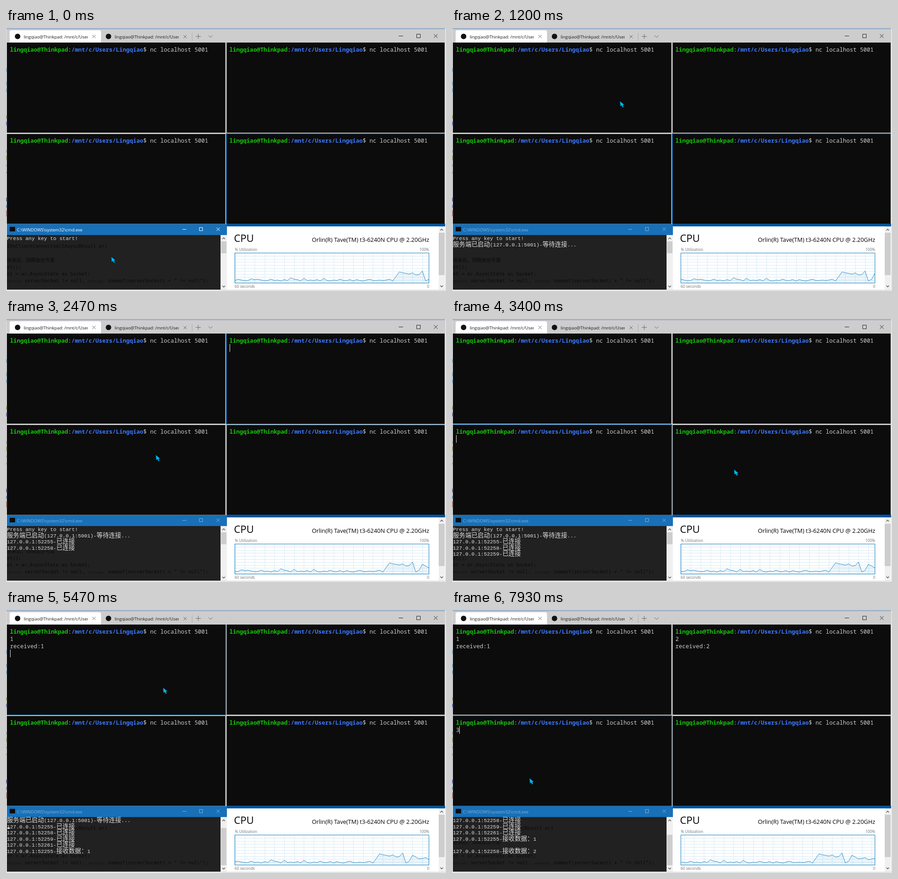
An HTML page that plays this animation: 968 by 578 pixels, repeating every 8000 ms.

```html
<!DOCTYPE html>
<html lang="en">
<head>
<meta charset="utf-8">
<title>Socket server demo</title>
<style>
  html, body { margin: 0; width: 100%; height: 100%; overflow: hidden; background: #e4e4e4; }
  svg { display: block; width: 968px; height: 578px; }
  text { white-space: pre; }
  .ui { font-family: "Open Sans", "Noto Sans", sans-serif; font-size: 9.45px; }
  .small { font-size: 8.5px; fill: #707070; }
  .end { text-anchor: end; }
  .term { font: 500 12.54px "Noto Sans Mono", "DejaVu Sans Mono", monospace; fill: #ccc; }
  .user { fill: #16c60c; font-weight: 600; }
  .path { fill: #3b78ff; font-weight: 600; }
  .con { font: 11.33px "Liberation Mono", monospace; fill: #dedede; }
  .cjk { font: 300 13.6px "Noto Sans CJK SC", "Noto Sans CJK", sans-serif; }
  .ghost { font: 10.5px "DejaVu Sans Mono", "Noto Sans CJK SC", monospace; fill: #0b0b0d; }
  .icon { fill: none; stroke: #222; }
  .cmd { stroke: #fff; fill: none; }
  .cmd text { fill: #fff; stroke: none; }
  .cmd.idle { opacity: .45; }
</style>
</head>
<body>
<svg id="stage" viewBox="0 0 968 578">
  <defs>
    <clipPath id="tab1"><rect x="30" y="5" width="150" height="27"/></clipPath>
    <clipPath id="tab2"><rect x="230" y="5" width="150" height="27"/></clipPath>
    <clipPath id="conClip"><rect x="2" y="455" width="470" height="120"/></clipPath>
    <clipPath id="plotClip"><rect x="503" y="494" width="428" height="67"/></clipPath>
  </defs>

  <g id="edge"></g>

  <!-- terminal window -->
  <rect x="1" y="1" width="965" height="430" fill="#cdcdcd"/>
  <path d="M1 1.5H966" stroke="#4a7db0"/>
  <path d="M8 32V9q0-4 4-4H205q4 0 4 4V32Z" fill="#fff"/>
  <circle cx="25.5" cy="18.5" r="6" fill="#111"/>
  <circle cx="225.5" cy="18.5" r="6" fill="#111"/>
  <g class="ui" fill="#1a1a1a">
    <text x="39" y="23.3" clip-path="url(#tab1)">lingqiao@Thinkpad: /mnt/c/Users</text>
    <text x="239" y="23.3" clip-path="url(#tab2)">lingqiao@Thinkpad: /mnt/c/Users</text>
  </g>
  <path class="icon" style="stroke:#666" d="M190 15l7 7m0-7l-7 7M390.500 15.500l7 7m0-7l-7 7M417.500 18.500h11m-5.500-5.500v11M445.500 16.500l4.500 4 4.500-4"/>
  <path d="M409.500 11V28" stroke="#aaa"/>
  <path class="icon" d="M864 17.500h9.500M903.500 13.500h8v8h-8zM941.500 13.500l8 8m0-8l-8 8"/>
  <g id="panes"></g>
  <rect id="caret" width="1" height="17" fill="#eee"/>

  <!-- performance panel -->
  <rect x="486" y="430" width="480" height="6" fill="#00539b"/>
  <rect x="486" y="436" width="480" height="139" fill="#fff"/>
  <rect x="952" y="436" width="13" height="139" fill="#f0f0f0"/>
  <rect x="952" y="450" width="13" height="93" fill="#cdcdcd"/>
  <path class="icon" style="stroke:#555" stroke-width="1.300" d="M955.500 445l3-3 3 3M955.500 566l3 3 3-3"/>
  <g class="ui">
    <text x="501.500" y="470" font-size="22.300">CPU</text>
    <text class="end" x="931" y="470" font-size="12.900">Orlin(R) Tave(TM) t3-6240N CPU @ 2.20GHz</text>
    <text class="small" x="503.500" y="489.500">% Utilization</text>
    <text class="small end" x="931" y="489.500">100%</text>
    <text class="small" x="503" y="571">60 seconds</text>
    <text class="small end" x="931" y="571">0</text>
  </g>
  <g clip-path="url(#plotClip)">
    <path id="grid" fill="none" stroke="#d9eaf4"/>
    <path id="area" fill="#117dbb" fill-opacity=".08"/>
    <path id="line" fill="none" stroke="#117dbb" stroke-width=".9"/>
  </g>
  <rect x="503.500" y="494.500" width="427" height="66" fill="none" stroke="#117dbb"/>

  <!-- console window -->
  <rect x="2" y="431" width="484" height="24" fill="#1870b8"/>
  <rect x="8" y="437" width="12" height="10" fill="#0c0c0c"/>
  <g id="cmd" class="cmd">
    <text class="ui" x="24" y="446.500">C:\WINDOWS\system32\cmd.exe</text>
    <path d="M388 442.500h8.500M425.500 438.500h7v7h-7zM463 438.500l7.500 7.500m0-7.500l-7.500 7.500"/>
  </g>
  <rect x="2" y="455" width="470" height="120" fill="#212121"/>
  <g clip-path="url(#conClip)">
    <g id="ghost" class="ghost"></g>
    <g id="con" class="con"></g>
    <rect id="mark" x="3" y="478" width="5" height="3" fill="#eee"/>
  </g>
  <rect x="472" y="455" width="14" height="120" fill="#f0f0f0"/>
  <rect id="thumb" x="473" width="12" fill="#cdcdcd"/>
  <path class="icon" style="stroke:#555" stroke-width="1.300" d="M476 464l3-3 3 3M476 566.500l3 3 3-3"/>

  <path id="mouse" d="M.5 .5L1.300 12.500 4 10.300 6.300 14.500 8.800 13.200 6.800 9.400 10.300 8.800Z" fill="#00b9f5" stroke="#06222e" stroke-width=".8"/>
</svg>
<script>
const LOOP = 8000, FPS = 15, CHAR = 7.525, ROW = 13.6;
const $ = id => document.getElementById(id);

function add(parent, tag, attrs, text) {
  const el = document.createElementNS('http://www.w3.org/2000/svg', tag);
  for (const k in attrs) el.setAttribute(k, attrs[k]);
  if (text) el.textContent = text;
  parent.appendChild(el);
  return el;
}
const show = (el, on) => { el.style.display = on ? '' : 'none'; };

// Slivers of the editor behind the windows: y, height, colour
[[88, 8, '#4aa3d8'], [118, 8, '#4aa3d8'], [133, 8, '#4aa3d8'], [192, 7, '#8a8a3a'], [206, 8, '#3048c0'],
 [268, 6, '#999'], [280, 10, '#8a9a3a'], [300, 4, '#999'], [316, 4, '#999'], [373, 8, '#2a2a90'],
 [389, 6, '#2a6ac0'], [401, 13, '#b05050']]
  .forEach(([y, height, fill]) => add($('edge'), 'rect', { x: 0, y, width: 2, height, fill }));

// Terminal panes, each with borders on its inner sides
const timed = [];
const panes = [[2, 32], [484, 32], [2, 231.5], [484, 231.5]].map(([x, y], i) => {
  const right = i % 2, low = i > 1, w = right ? 481 : 482, h = low ? 199 : 199.5;
  const g = add($('panes'), 'g');
  const border = add(g, 'rect', { x, y, width: w, height: h });
  add(g, 'rect', { x: x + (right ? 1.5 : 0), y: y + (low ? 1.5 : 0), width: w - 1.5, height: h - 1.5, fill: '#0c0c0c' });
  const tx = right ? 491.5 : 8.7, ty = low ? 251.7 : 51.7;
  const prompt = add(g, 'text', { x: tx, y: ty, class: 'term' });
  add(prompt, 'tspan', { class: 'user' }, 'lingqiao@Thinkpad');
  add(prompt, 'tspan', {}, ':');
  add(prompt, 'tspan', { class: 'path' }, '/mnt/c/Users/Lingqiao');
  add(prompt, 'tspan', {}, '$ nc localhost 5001');
  return { g, border, tx, ty };
});
[[4930, 0, 1, '1'], [5130, 0, 2, 'received:1'], [6400, 1, 1, '2'], [6670, 1, 2, 'received:2'], [7930, 2, 1, '3']]
  .forEach(([at, i, row, s]) => {
    const p = panes[i];
    timed.push({ at, el: add(p.g, 'text', { x: p.tx, y: p.ty + row * 16, class: 'term' }, s) });
  });

// Code showing faintly through the console
[[2, 483, 'IOnClientConnected(IAsyncResult ar)'], [2, 514, '进来后，则释放信号量'], [2, 529, 'et();'],
 [2, 544, 'et = ar.AsyncState as Socket;'], [41, 559, 'serverSocket != null,'],
 [224, 559, 'nameof(serverSocket) + " != null");']]
  .forEach(([x, y, s]) => add($('ghost'), 'text', { x, y }, s));
add($('ghost'), 'text', { x: -8, y: 559, style: 'font-size:7.5px', opacity: .6 }, 'condition:');
add($('ghost'), 'text', { x: 182, y: 559, style: 'font-size:7.5px', opacity: .6 }, 'message:');

// Console output: time, row, text
const peer = (at, row, port, s) => [at, row, `127.0.0.1:${port}-${s}`];
[[0, 0, 'Press any key to start!'],
 [70, 1, '服务端已启动(127.0.0.1:5001)-等待连接...'],
 peer(1600, 2, 52255, '已连接'), peer(2070, 3, 52258, '已连接'),
 peer(3000, 4, 52259, '已连接'), peer(3670, 5, 52261, '已连接'),
 peer(5130, 6, 52255, '接收数据：1'), peer(6670, 8, 52258, '接收数据：2')]
  .forEach(([at, row, s]) => {
    const el = add($('con'), 'g'), y = 455 + row * ROW;
    const parts = s.match(/[\x00-\xff]+|[^\x00-\xff]+/g);
    const wide = c => c.charCodeAt(0) > 255;
    const cells = [...s].reduce((n, c) => n + (wide(c) ? 2 : 1), 0);
    add(el, 'rect', { x: 2, y, width: cells * 6.8, height: ROW, fill: '#212121' });
    const text = add(el, 'text', { x: 2, y: y + 11 });
    parts.forEach(p => add(text, 'tspan', wide(p) ? { class: 'cjk' } : {}, p));
    timed.push({ at, el });
  });

// CPU load, one sample per second
const load = [5, 8, 6, 5, 5, 9, 7, 8, 6, 5, 5, 8, 5, 6, 4, 7, 5, 11, 8, 7, 4, 10, 5, 6, 5, 7, 4, 10, 5, 4, 6, 5, 8, 5,
  5, 7, 4, 7, 5, 4, 6, 8, 5, 5, 6, 5, 6, 8, 4, 14, 24, 22, 21, 19, 22, 17, 18, 26, 4, 8, 21, 17, 13, 14, 16, 11, 13, 14];
const DX = 427 / 59;
let plotted = -1;
function plot(k) {
  if (k === plotted) return;
  plotted = k;
  const pts = load.slice(k, k + 60).map((h, i) => `${(503.5 + i * DX).toFixed(1)} ${560 - h}`).join('L');
  $('line').setAttribute('d', 'M' + pts);
  $('area').setAttribute('d', `M503.5 560.5L${pts}L930.5 560.5Z`);
  let d = '';
  for (let i = 1; i < 10; i++) d += `M503 ${Math.round(494.5 + i * 6.6) + .5}H931`;
  for (let i = 0; i < 21; i++) d += `M${Math.round(503.5 + (i * 3 - k % 3) * DX) + .5} 494V561`;
  $('grid').setAttribute('d', d);
}

// Focus and caret: time, pane, column, row
const focus = [[0, 3], [1270, 0, 58, 0], [1470, 0, 0, 1], [1870, 1, 58, 0], [2070, 1, 0, 1], [2800, 2, 58, 0],
  [3000, 2, 0, 1], [3470, 3, 58, 0], [3670, 3, 0, 1], [4200, 0, 0, 1], [4930, 0, 1, 1], [5130, 0, 0, 3],
  [6000, 1, 0, 1], [6400, 1, 1, 1], [6670, 1, 0, 3], [7530, 2, 0, 1], [7930, 2, 1, 1]];

// Pointer stops: time, x, y
const stops = [[0, 231, 502], [400, 231, 502], [1130, 369, 160], [1470, 369, 160], [1670, 600, 140], [2070, 600, 140],
  [2470, 329, 298], [2670, 262, 336], [3000, 262, 336], [3400, 620, 330], [3670, 620, 330], [4130, 345, 170],
  [5600, 345, 170], [5930, 734, 127], [7000, 734, 127], [7460, 170, 369], [LOOP, 170, 369]];
function pointer(t) {
  const i = stops.findIndex(s => s[0] > t), [t0, x0, y0] = stops[i - 1], [t1, x1, y1] = stops[i];
  const u = (t - t0) / (t1 - t0), e = u * u * (3 - 2 * u);
  return [x0 + (x1 - x0) * e, y0 + (y1 - y0) * e];
}

function render(t) {
  timed.forEach(o => show(o.el, t >= o.at));
  plot(t < 470 ? 0 : Math.floor((t - 470) / 1000) + 1);

  const [at, pane, col, row] = focus.filter(f => f[0] <= t).pop();
  panes.forEach((p, i) => p.border.setAttribute('fill', i === pane ? '#0a6cbc' : '#ccc'));
  const p = panes[pane], caret = $('caret');
  show(caret, row !== undefined && (t - at) % 1060 < 530);
  if (row !== undefined) {
    caret.setAttribute('x', Math.round(p.tx + col * CHAR));
    caret.setAttribute('y', Math.round(p.ty - 13 + row * 16));
  }

  $('cmd').classList.toggle('idle', t >= 1200);
  const scroll = t < 5130 ? 0 : t < 6670 ? 1 : 3;
  $('con').setAttribute('transform', `translate(0 ${-scroll * ROW})`);
  show($('mark'), scroll === 1);
  const [top, end] = [[469, 495], [479, 561], , [494, 561]][scroll];
  $('thumb').setAttribute('y', top);
  $('thumb').setAttribute('height', end - top);

  const step = Math.floor((t + 5) * FPS / 1000) * 1000 / FPS;
  const [x, y] = pointer(Math.min(step, LOOP - 1));
  $('mouse').setAttribute('transform', `translate(${Math.round(x)} ${Math.round(y)})`);
}

const start = performance.now();
function frame() {
  render((performance.now() - start) % LOOP);
  requestAnimationFrame(frame);
}
render(0);
requestAnimationFrame(frame);
</script>
</body>
</html>
```
